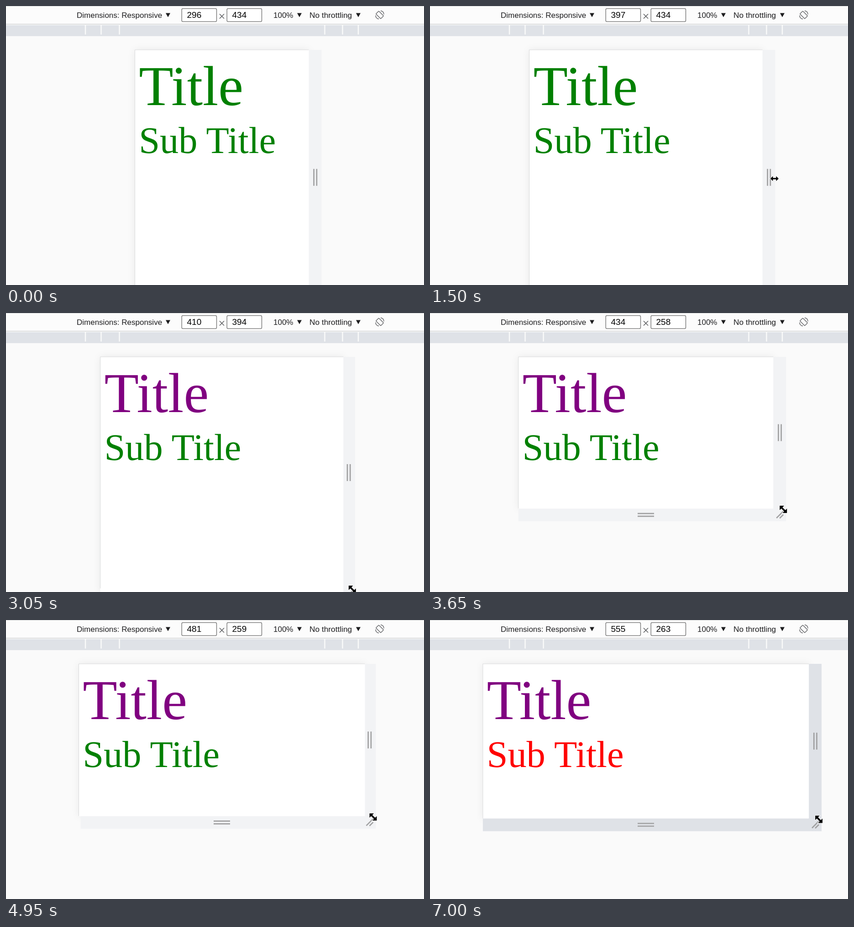
An HTML page for the animation above (7.13 s loop, 916 px wide and 611 px high).

```html
<!DOCTYPE html>
<html lang="en">
<head>
<meta charset="utf-8">
<title>Responsive resize</title>
<style>
  html, body { margin: 0; width: 100%; height: 100%; overflow: hidden; background: #fafafa; }
  svg { display: block; }
  .ui { font: 17px "Liberation Sans", Arial, sans-serif; fill: #1d1d1f; }
  .wide { font-size: 17.3px; }
  .size { font-size: 19px; fill: #000; }
  .page { font-family: "Liberation Serif", Times, serif; text-rendering: geometricPrecision; }
  .grip { stroke: #a1a1a2; stroke-width: 2.7; fill: none; }
  #sheet { fill: #fff; }
  #glow { fill: #fff; filter: drop-shadow(0 0 8px rgba(0, 20, 10, .07)); }
</style>
</head>
<body>
<svg width="916" height="611" viewBox="0 0 916 611">
  <rect id="glow" y="96"/>
  <path id="bars"/>
  <rect id="sheet" y="96"/>
  <path id="edge" fill="none" stroke="#d9dadb"/>
  <g id="page" class="page">
    <text y="217" font-size="123.5" id="title">Title</text>
    <text y="322" font-size="82.4" id="sub">Sub Title</text>
  </g>
  <path id="side" class="grip" d="M11.2-18.5v37M17.4-18.5v37"/>
  <path id="base" class="grip" d="M-18 11h36M-18 17h36"/>
  <path id="corner" class="grip" d="M7 21L22 6M14 21.500l8-8"/>

  <path fill="#fcfcfc" d="M0 0h916v42H0z"/>
  <path fill="#d2d3d4" d="M0 0h916v1H0zM0 39h916v1.500H0z"/>
  <path fill="#dfe2e7" d="M0 42h916v24H0z"/>
  <path stroke="#fafafa" stroke-width="2.5" d="M174 42v20.500M208.500 42v20.500M248.500 42v20.500M698.500 42v20.500M737.500 42v20.500M772 42v20.500"/>
  <g class="ui">
    <text x="155" y="26">Dimensions: Responsive</text>
    <text x="586" y="26">100%</text>
    <text x="665" y="26" class="wide">No throttling</text>
    <path d="M350 15.500h10l-5 9zM638 15.500h10l-5 9zM767 15.500h10l-5 9z"/>
    <g fill="#fff" stroke="#6c6c6c" stroke-width="1.3">
      <rect x="385.200" y="5.700" width="76.300" height="28.500" rx="2.500"/>
      <rect x="484.200" y="5.700" width="76.300" height="28.500" rx="2.500"/>
    </g>
    <text id="w" class="size" x="396.500" y="26"></text>
    <text id="h" class="size" x="495.500" y="26"></text>
  </g>
  <path stroke="#5f6063" stroke-width="1.6" d="M468 17.500l10 10m0-10l-10 10"/>
  <g fill="none" stroke="#626366" stroke-width="1.4" transform="translate(819 19.500)">
    <rect x="-4.500" y="-7.500" width="9" height="15" rx="1" transform="rotate(-45)"/>
    <path d="M2-9Q9-8 9-1M-2 9Q-9 8-9 1"/>
  </g>
  <path id="cursor" stroke="#fff" stroke-width="1.4" paint-order="stroke" d="M-9 0l5.500-5.500v4h7v-4L9 0 3.500 5.500v-4h-7v4z"/>
</svg>
<script>
const LOOP = 7130, STEP = 50, SCALE = 1.287, MID = 473, TOP = 96, BAR = 28;
const LAG = 15; // the page is laid out this many ms behind the pointer

// Each drag eases the viewport to a new size
const drags = [
  { from: 1100, to: 1500, w: 397, h: 434 },
  { from: 1500, to: 1850, w: 429, h: 434 },
  { from: 2650, to: 2700, w: 429, h: 430 },
  { from: 2950, to: 3111, w: 401, h: 377 },
  { from: 3111, to: 3650, w: 434, h: 258 },
  { from: 3650, to: 4518, w: 604, h: 258 },
  { from: 4518, to: 5260, w: 407, h: 260 },
  { from: 5500, to: 5975, w: 555, h: 262.7 }
];

const $ = id => document.getElementById(id);
const set = (id, attrs) => { for (const k in attrs) $(id).setAttribute(k, attrs[k]); };
const move = (id, x, y, extra = "") => set(id, { transform: `translate(${x} ${y}) ${extra}` });
const progress = (t, from, to) => Math.min(1, Math.max(0, (t - from) / (to - from)));
const ease = u => u * u * (3 - 2 * u);

function sizeAt(t) {
  let w = 296, h = 434;
  for (const d of drags) {
    const k = ease(progress(t, d.from, d.to));
    w += (d.w - w) * k;
    h += (d.h - h) * k;
  }
  return { w, h };
}

const leftOf = w => MID - w * SCALE / 2;

function placeCursor(t, right, bottom) {
  $("cursor").style.display = t < 150 ? "none" : "";
  if (t < 1100) {
    const u = ease(progress(t, 250, 950)), swing = Math.sin(Math.PI * u);
    move("cursor", 681 + 9 * u + 50 * swing, 441 - 63 * u + 150 * swing);
  } else if (t <= 2100) {
    const u = progress(t, 1850, 2100);
    move("cursor", right + 26.5 - 46 * u, 378 + 240 * u);
  } else {
    move("cursor", right + 22, bottom + 2, "rotate(45) scale(1.25)");
  }
}

function draw(now) {
  const t = Math.floor(now % LOOP / STEP) * STEP;
  const size = sizeAt(t), late = sizeAt(t - LAG);
  const w = Math.round(size.w), h = Math.round(size.h);
  const left = leftOf(w), right = 2 * MID - left, bottom = TOP + h * SCALE;
  const hover = t >= 300 && t < 1150 || t >= 2350 && t < 2950 || t >= 6300;

  // While shrinking, the lagging sheet still overhangs the frame
  const sheetW = Math.max(w, late.w), sheetLeft = leftOf(sheetW);
  const sheet = { x: sheetLeft, width: sheetW * SCALE, height: Math.max(h, late.h) * SCALE };
  set("glow", sheet);
  set("sheet", sheet);
  set("edge", { d: `M${sheetLeft} ${bottom}V${TOP}h${sheet.width}` });
  set("bars", {
    d: `M${right} ${TOP}h${BAR}V${bottom + BAR}H${left}v${-BAR}H${right}z`,
    fill: hover ? "#dfe2e7" : "#f2f3f5"
  });

  move("page", leftOf(late.w) + 8.7, 0);
  set("title", { fill: w >= 400 ? "#800080" : "#008000" });
  set("sub", { fill: w >= 500 ? "#f00" : "#008000" });
  move("side", right, (TOP + bottom) / 2);
  move("base", MID, bottom);
  move("corner", right, bottom);
  $("w").textContent = w;
  $("h").textContent = h;
  placeCursor(t, right, bottom);
}

const start = performance.now();
(function frame() {
  draw(performance.now() - start);
  requestAnimationFrame(frame);
})();
</script>
</body>
</html>
```
